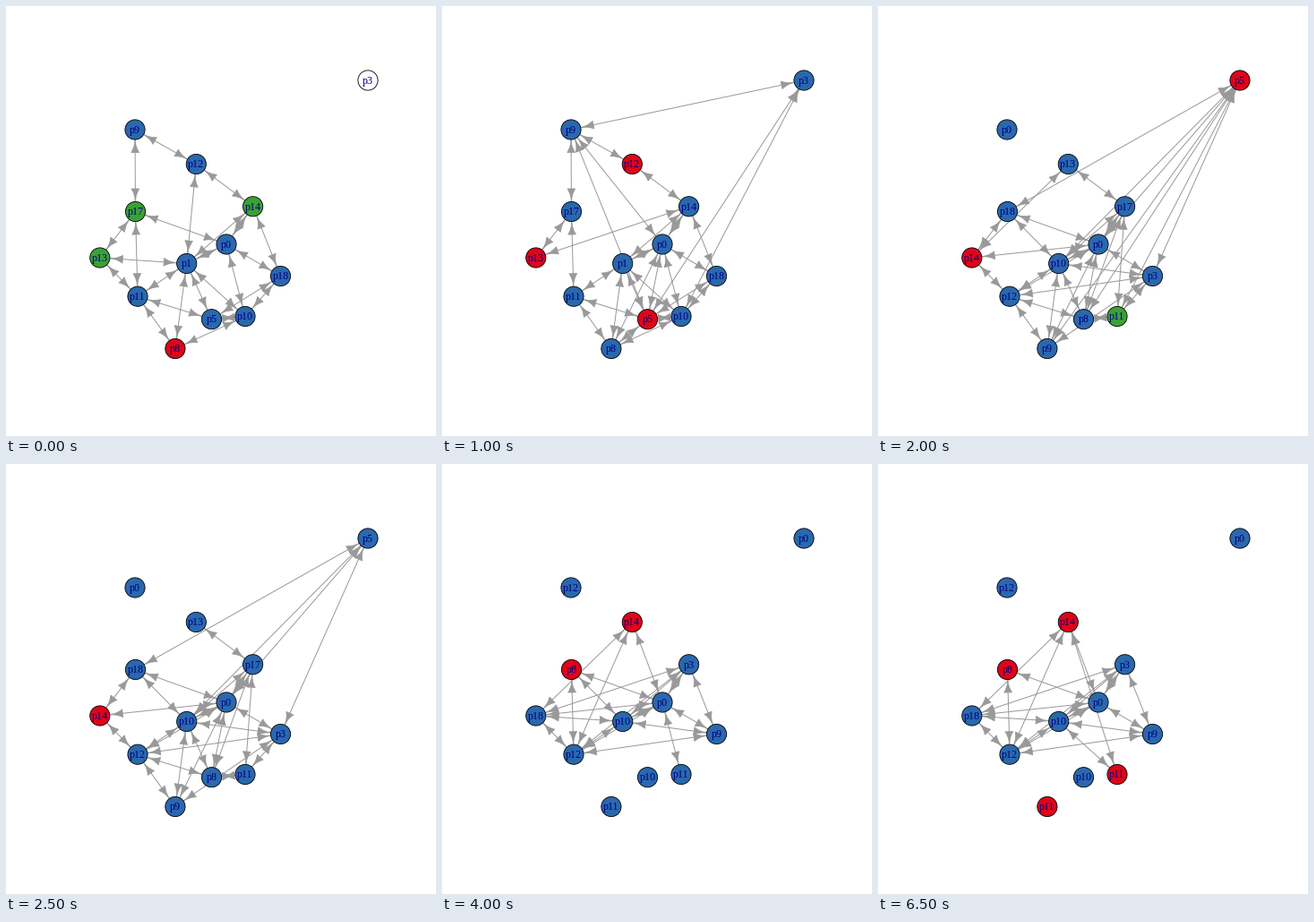
Animation, 480 px wide and 480 px high, one loop 7 s. Source, as a matplotlib script:

```python
import numpy as np
import matplotlib.pyplot as plt
from matplotlib.animation import FuncAnimation
from matplotlib.collections import LineCollection, PolyCollection
from matplotlib.patches import Circle

SIZE, DPI = 480, 100
PX = 72 / DPI                      # points per pixel
RADIUS, HEAD = 11.1, 14.4
GREY = "#999999"
FILL = {"b": "#2a68ae", "r": "#dd0519", "g": "#3aa135", "w": "#ffffff"}

NODES = "ABCDEFGHIJKLM"
SPOTS = [(404, 83), (144, 138), (212.3, 176.5), (275.6, 223.8), (144.5, 229.5),
         (246, 266), (104.8, 281), (201.7, 287.5), (306.5, 301.5), (147, 324.2),
         (229.5, 349.7), (267, 346.5), (188.9, 382.5)]
POS = {n: np.array(p, float) for n, p in zip(NODES, SPOTS)}

NAMES = [s.split() for s in (
    "3 9 12 14 17 0 13 1 18 11 5 10 8",
    "5 0 13 17 18 0 14 10 3 12 8 11 9",
    "9 11 13 18 3 0 14 10 8 12 0 11 10",
    "0 12 14 3 8 0 18 10 9 12 10 11 11")]


def links(text):
    return set(text.split())


START = links("BC BE CD CH EG EJ EF GH GJ HJ JK JM DH FH HM HK HL DF FI FL "
              "DI IL IK KL LM")
JOINED = links("AB AK AL BC BE BF BK CD DG DH DF DI EG EJ FH FI FK FL FM HJ "
               "HK HL HM IL IK JK JM KL KM LM")
FAN = links("AE AH AF AK AM AL AI CD CG EG EF EH FG GJ HJ FJ IJ JK JM FH HI "
            "DH HK HM FI DF FM FK DK DL IL IM KL")
SPLIT = links("AE AH AF CH CF CI DE DG DH DF EF EH EJ FG FH FI FJ GJ GL HI "
              "HJ IJ DJ")
CORE = links("CG CJ CF DG DH DF DJ DI EF EH EJ FG GH GJ FH HI HJ FI FJ FL IJ")
LATE = CORE | links("HL CL")
LAST = LATE - links("FL EH")

# names, fills and links for each half second
STEPS = [
    (0, "wbbggbgbbbbbr", START),
    (0, "bbbbbbbbbbbbr", (JOINED - {"AK"}) | {"CH"}),
    (0, "bbrbbbrbbbrbb", JOINED),
    (1, "bbgbbbrbbbgrb", FAN - links("AF AH AI")),
    (1, "rbbbbbrbbbbgb", FAN),
    (1, "bbbbbbrbbbbbb", FAN - links("AK AL AM CG")),
    (2, "bbrbrbbbbbbrr", SPLIT),
    (3, "bbbbrbbbbbbgg", (SPLIT & CORE) | links("DI GH")),
    (3, "bbrbrbbbbbbbb", CORE),
    (3, "bbrbrbbbbbbbb", (CORE - {"CG"}) | {"HL"}),
    (3, "bbrbrbbbbbbbb", LATE),
    (3, "bbrbgbbbbbbgg", LAST),
    (3, "bbrbgbbbbbbgg", LAST),
    (3, "bbrbrbbbbbbrr", LAST),
]


def arrow_head(tip, way):
    """Arrow head with concave sides, pointing along the unit vector way."""
    back = np.sqrt(np.linspace(0, HEAD ** 2, 9))
    half = 0.3 * back ** 2 / HEAD + 0.07
    side = np.array([-way[1], way[0]])
    spine = tip - back[:, None] * way
    return np.vstack([(spine + half[:, None] * side)[::-1],
                      spine - half[:, None] * side])


def edge_shapes(edges):
    lines, heads = [], []
    for a, b in sorted(edges):
        p, q = POS[a], POS[b]
        way = (q - p) / np.hypot(*(q - p))
        p, q = p + RADIUS * way, q - RADIUS * way
        lines.append([p + 4 * way, q - 4 * way])
        heads += [arrow_head(q, way), arrow_head(p, -way)]
    return lines, heads


fig = plt.figure(figsize=(SIZE / DPI, SIZE / DPI), dpi=DPI, facecolor="white")
ax = fig.add_axes([0, 0, 1, 1])
ax.set(xlim=(0, SIZE), ylim=(SIZE, 0))
ax.axis("off")

shafts = ax.add_collection(LineCollection([], colors=GREY, linewidths=PX, zorder=1),
                           autolim=False)
tips = ax.add_collection(PolyCollection([], facecolors=GREY, edgecolors=GREY,
                                        linewidths=0.75 * PX, zorder=2), autolim=False)
discs, tags = [], []
for x, y in SPOTS:
    discs.append(ax.add_patch(Circle((x, y), RADIUS, ec="black",
                                     lw=0.85 * PX, zorder=3)))
    tags.append(ax.text(x, y + 3.8, "", color="#000080", size=12 * PX,
                        family="Liberation Serif", ha="center", va="baseline",
                        zorder=4))


def draw(i):
    row, fills, edges = STEPS[i]
    lines, heads = edge_shapes(edges)
    shafts.set_segments(lines)
    tips.set_verts(heads)
    for disc, tag, fill, name in zip(discs, tags, fills, NAMES[row]):
        disc.set_facecolor(FILL[fill])
        tag.set_text("p" + name)
    return [shafts, tips, *discs, *tags]


anim = FuncAnimation(fig, draw, frames=len(STEPS), interval=500,
                     repeat=True, repeat_delay=0, blit=False)
plt.show()
```
